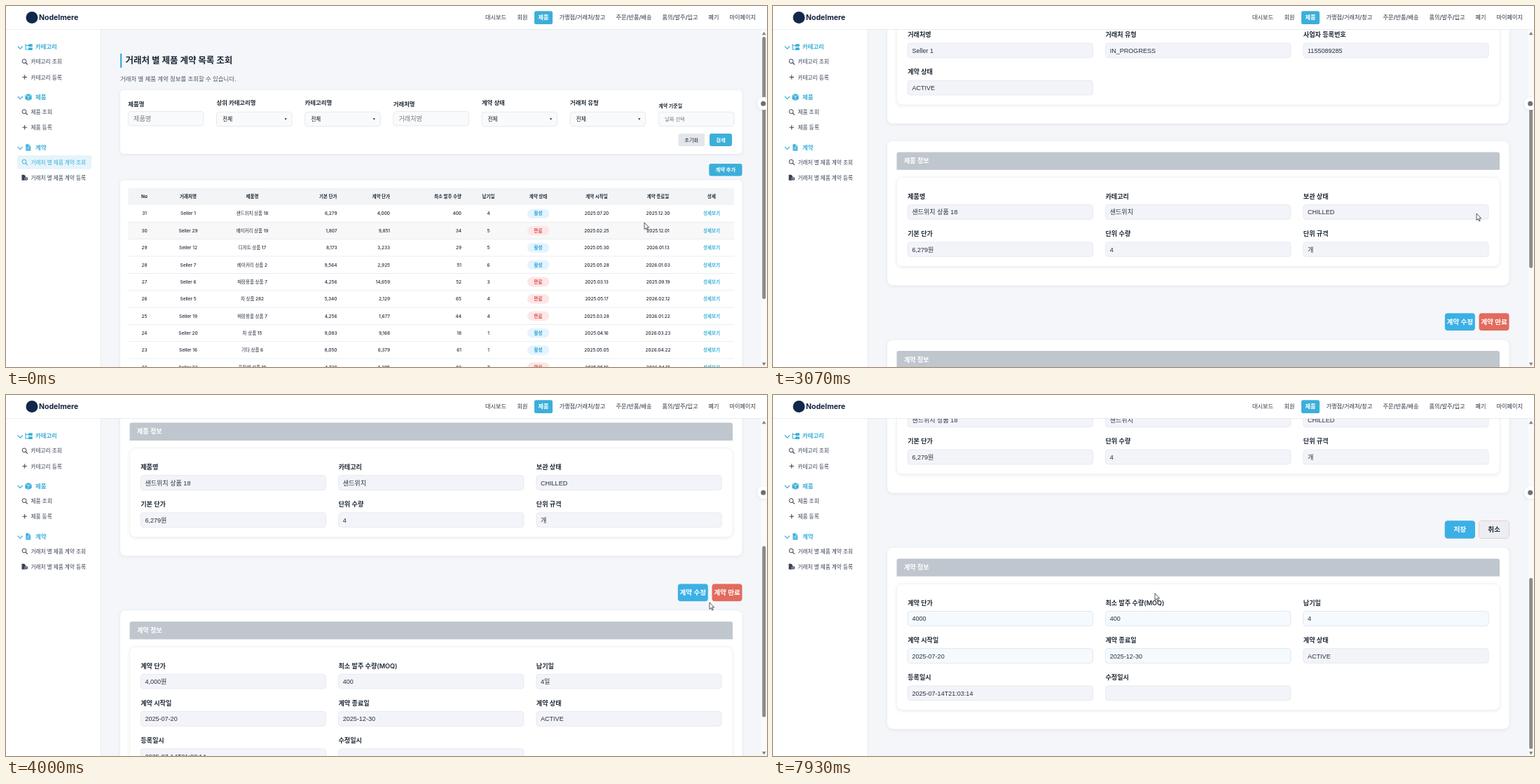
An HTML page for the animation above (8000 ms loop, 1086 by 515 pixels).

```html
<!DOCTYPE html>
<html lang="ko">
<head>
<meta charset="utf-8">
<title>계약 관리</title>
<style>
html, body { margin: 0; width: 100%; height: 100%; overflow: hidden; background: #f4f6fa; }
svg { display: block; width: 1086px; height: 515px; }
text { font-family: Inter, "Noto Sans CJK KR", "Noto Sans CJK", sans-serif; white-space: pre; }
.input text { font-family: "Liberation Sans", "Noto Sans CJK KR", "Noto Sans CJK", sans-serif; }
.status text { font-family: "Open Sans", sans-serif; }
.card { filter: drop-shadow(0 1px 2px #1c2a4418); }
</style>
</head>
<body>
<svg id="stage" viewBox="0 0 1086 515"></svg>
<script>
const BLUE = '#3bafda', INK = '#1f2937', LOOP = 8000, NOTCH = 56.3, MAX = 427.6;
const ROW_TOP = 284, ROW_H = 24.35;

const text = (x, y, s, size, fill = INK, weight = 400, anchor = 'start') =>
  `<text x="${x}" y="${y + size * .36}" font-size="${size}" fill="${fill}" font-weight="${weight}" text-anchor="${anchor}">${s}</text>`;
const rect = (x, y, w, h, fill, r = 0, more = '') =>
  `<rect x="${x}" y="${y}" width="${w}" height="${h}" rx="${r}" fill="${fill}" ${more}/>`;
const path = (d, fill, stroke = 'none', width = 1, more = '') =>
  `<path d="${d}" fill="${fill}" stroke="${stroke}" stroke-width="${width}" ${more}/>`;
const group = (id, body, more = '') => `<g id="${id}" ${more}>${body}</g>`;
const input = body => `<g class="input">${body}</g>`;
const card = (y, h, r = 6) => rect(163, y, 887.5, h, '#fff', r, 'class="card"');
const button = (x, y, w, h, label, size, fill, color = '#fff', r = 3, weight = 700) =>
  rect(x, y, w, h, fill, r) + text(x + w / 2, y + h / 2, label, size, color, weight, 'middle');
const heading = (title, note) => rect(163, 68, 2.3, 20, BLUE) +
  text(170.5, 77.5, title, 12.5, INK, 700) + text(163, 103.5, note, 8.4, '#4b5563');

// Top bar
const nav = [[684, '대시보드'], [729.5, '회원'], [759.5, '제품'], [789.5, '가맹점/거래처/창고'],
  [870.5, '주문/반품/배송'], [936.5, '품의/발주/입고'], [1002.5, '폐기'], [1032.5, '마이페이지']];
const header = () => rect(0, 0, 1086, 33.5, '#fff') + rect(0, 33, 1086, .8, '#e3e6eb') +
  '<circle cx="37" cy="16.5" r="8.5" fill="#10284a"/>' + text(47, 16.7, 'Nodelmere', 10.5, '#14233f', 700) +
  rect(754, 7.3, 26, 18.7, BLUE, 2.5) +
  nav.map(([x, s], i) => text(x, 16.2, s, 8.15, i == 2 ? '#fff' : '#283341', i == 2 ? 700 : 500)).join('');

// Side menu
const icons = {
  search: (y, c) => `<circle cx="26" cy="${y - .7}" r="2.9" fill="none" stroke="${c}"/>` + path(`M28.2 ${y + 1.5}l2.6 2.6`, 'none', c, 1.2),
  plus: (y, c) => path(`M23.5 ${y - .5}h6.4m-3.2-3.2v6.4`, 'none', c),
  file: (y, c) => path(`M22.5 ${y - 4}h3.5l2 2v6h-5.5z`, c) + `<circle cx="29" cy="${y + 1.7}" r="2.4" fill="${c}" stroke="#fff" stroke-width=".5"/>` +
    path(`M27.9 ${y + 1.7}h2.2m-1.1-1.1v2.2`, 'none', '#fff', .5),
  tree: y => path(`M28 ${y - 4.5}v8h4.5M28 ${y - 2}h4.5`, 'none', BLUE, 1.1) + rect(32, y - 4.3, 5.8, 3.8, BLUE, .7) + rect(32, y + .8, 5.8, 3.8, BLUE, .7),
  box: y => path(`M32 ${y - 4.8}l4.6 1.8v6l-4.6 2-4.6-2v-6z`, BLUE) + path(`M27.8 ${y - 2.6}l4.2 1.6 4.2-1.6M32 ${y - 1}v5`, 'none', '#fff', .7),
  sheet: y => path(`M28.3 ${y - 4.6}h4.4l2.5 2.5v6.9h-6.9z`, BLUE) + path(`M29.5 ${y}h4.4m-4.4 2.4h1.6l1-1.2 .8 1.2h1M32.5 ${y - 4.5}v2.6h2.6`, 'none', '#fff', .6)
};
const menu = [
  [58.5, '카테고리', 'tree', [[79.5, 'search', '카테고리 조회'], [102, 'plus', '카테고리 등록']]],
  [130, '제품', 'box', [[151.3, 'search', '제품 조회'], [173.7, 'plus', '제품 등록']]],
  [201.8, '계약', 'sheet', [[222.8, 'search', '거래처 별 제품 계약 조회'], [244.8, 'file', '거래처 별 제품 계약 등록']]]
];
const menuItem = ([y, icon, s], c = '#374151') => icons[icon](y, c) + text(35.5, y, s, 7.65, c, 500);
const sidebar = () => rect(0, 33.8, 135.5, 482, '#fff') + rect(135, 33.8, .8, 482, '#e3e6eb') +
  menu.map(([y, s, icon, items]) => path(`M16.8 ${y - 1}l3.5 3.6 3.5-3.6`, 'none', BLUE, 1.2) +
    icons[icon](y) + text(42, y - .2, s, 8.4, BLUE, 700) + items.map(i => menuItem(i)).join('')).join('') +
  group('selected', rect(16, 213, 106, 19.7, '#e6f4fb', 3) + menuItem(menu[2][3][0], BLUE));

// Contract list
const filters = ['제품명', '상위 카테고리명', '카테고리명', '거래처명', '계약 상태', '거래처 유형', '계약 기준일'];
const filterBox = (label, i) => {
  const x = 174.3 + i * 126.15, free = i == 0 || i == 3, date = i == 6;
  const y = free ? 150.4 : 151.2;
  return text(x, free ? 140.3 : date ? 142 : 137.6, label, date ? 7 : 8.4, INK, 600) +
    rect(x, y, 107.7, 20.5, '#f9fafb', 4, 'stroke="#dde1e7" stroke-width=".7"') +
    input(free ? text(x + 7.8, 160.6, label, 9.05, '#757b86') :
      date ? text(x + 9, 161.2, '날짜 선택', 7.2, '#757b86') :
      text(x + 8.8, 161.2, '전체', 7.5, '#111') + path(`M${x + 97} 160.2h3.4l-1.7 2.2z`, '#222'));
};
const columns = [[197.5, 'No', 'middle'], [260, '거래처명', 'middle'], [351.5, '제품명', 'middle'],
  [472.5, '기본 단가', 'end'], [548, '계약 단가', 'end'], [650, '최소 발주 수량', 'end'], [688.5, '납기일', 'middle'],
  [759.5, '계약 상태', 'middle'], [843, '계약 시작일', 'middle'], [930.5, '계약 종료일', 'middle'], [1007, '상세', 'middle']];
const rows = `1|샌드위치 상품 18|6,279|4,000|400|4|활성|2025.07.20|2025.12.30
29|베이커리 상품 19|1,807|9,851|34|5|만료|2025.02.25|2025.12.01
12|디저트 상품 17|8,173|3,233|29|5|활성|2025.05.30|2026.01.13
7|베이커리 상품 2|9,564|2,925|51|6|활성|2025.05.28|2026.01.03
6|매장용품 상품 7|4,256|14,659|52|3|만료|2025.03.13|2025.09.19
5|차 상품 282|5,340|2,129|65|4|만료|2025.05.17|2026.02.12
19|매장용품 상품 7|4,256|1,677|44|4|만료|2025.03.28|2026.01.22
20|차 상품 15|9,083|9,168|18|1|활성|2025.04.16|2026.03.23
16|기타 상품 6|8,050|6,379|61|1|활성|2025.05.05|2026.04.22
23|포장재 상품 10|4,739|4,205|82|7|만료|2025.05.19|2026.04.17`.split('\n').map(r => r.split('|'));
const tableRow = (r, i) => {
  const y = ROW_TOP + ROW_H * (i + .5), cells = [31 - i, 'Seller ' + r[0], ...r.slice(1), '상세보기'];
  const on = r[6] == '활성';
  return rect(174.3, y + ROW_H / 2 - .4, 865, .7, '#e3e6ea') +
    rect(744, y - 6.8, 31.2, 13.6, on ? '#e3f4fe' : '#fde6e6', 6.8) +
    cells.map((s, k) => {
      const [x, , anchor] = columns[k];
      const color = k == 7 ? (on ? '#1d9bd8' : '#dc3f3f') : k == 10 ? BLUE : INK;
      const t = text(x, y, s, 6.45, color, k == 7 || k == 10 ? 600 : 500, anchor);
      return i == 0 && k == 10 ? group('link', t) : t;
    }).join('');
};
const list = () => heading('거래처 별 제품 계약 목록 조회', '거래처 별 제품 계약 정보를 조회할 수 있습니다.') +
  card(120, 91, 5) + filters.map(filterBox).join('') +
  button(959.5, 182, 37.5, 18, '초기화', 7.2, '#e3e6ea', INK, 3, 500) +
  button(1004, 182, 32, 18, '검색', 7.4, BLUE) + button(1003.3, 225, 47.2, 17.6, '계약 추가', 7.4, BLUE) +
  card(248.5, 400, 5) + rect(174.3, 259.5, 865, 24.5, '#f2f4f6') +
  columns.map(([x, s, a]) => text(x, 271.7, s, 6.5, INK, 700, a)).join('') +
  rect(174.3, ROW_TOP, 865, ROW_H, '#f8f8f9', 0, 'id="hover"') + rows.map(tableRow).join('');

// Contract detail
const panel = (top, title, fields) => {
  const inner = 20.6 + 53.2 * Math.ceil(fields.length / 3);
  return card(top, inner + 78.6, 8) +
    path(`M176.5 ${top + 41}v-22.3q0-3 3-3h854.5q3 0 3 3v22.3z`, '#c0c6ce') + text(187, top + 28.2, title, 9.1, '#fff', 700) +
    rect(176.5, top + 51.8, 860.5, inner, '#fff', 8, 'class="card" stroke="#eef0f4" stroke-width=".7"') +
    fields.map(([label, value, edit], i) => {
      const x = 192.2 + i % 3 * 282.3, y = top + 78.8 + 53.2 * (i / 3 | 0);
      const box = (fill, s) => rect(x, y + 12, 264.3, 20.8, fill, 4, 'stroke="#e0e4ea" stroke-width=".7"') +
        input(text(x + 6.2, y + 22.6, s, 9.05, '#27303d'));
      return text(x, y, label, 9.1, INK, 600) + box('#f3f4f9', value) +
        (edit ? `<g class="edit">${box('#f5faff', edit)}</g>` : '');
    }).join('');
};
const detail = () => heading('거래처 별 제품 계약 상세 조회', '거래처 별 제품 계약 상세 정보를 조회할 수 있습니다.') +
  panel(131.1, '거래처 정보', [['거래처명', 'Seller 1'], ['거래처 유형', 'IN_PROGRESS'], ['사업자 등록번호', '1155089285'], ['계약 상태', 'ACTIVE']]) +
  panel(361.7, '제품 정보', [['제품명', '샌드위치 상품 18'], ['카테고리', '샌드위치'], ['보관 상태', 'CHILLED'],
    ['기본 단가', '6,279원'], ['단위 수량', '4'], ['단위 규격', '개']]) +
  button(958.8, 607.2, 43, 24.8, '계약 수정', 9.6, '#3bb0e5', '#fff', 4) +
  button(1007.5, 607.2, 43, 24.8, '계약 만료', 9.6, '#e26b5d', '#fff', 4) +
  `<g class="edit">${button(958.8, 607.2, 43, 24.8, '저장', 9.6, '#3bb0e5', '#fff', 4) +
    button(1007.5, 607.2, 43, 24.8, '취소', 9.6, '#eceef1', INK, 4, 600)}</g>` +
  panel(645.3, '계약 정보', [['계약 단가', '4,000원', '4000'], ['최소 발주 수량(MOQ)', '400', '400'], ['납기일', '4일', '4'],
    ['계약 시작일', '2025-07-20', '2025-07-20'], ['계약 종료일', '2025-12-30', '2025-12-30'], ['계약 상태', 'ACTIVE'],
    ['등록일시', '2025-07-14T21:03:14'], ['수정일시', '']]);

const scrollbar = () => rect(1077.5, 33.8, 8.5, 482, '#fafafa') + path('M1078.8 41.2l2.9-4.4 2.9 4.4z', '#858585') +
  path('M1078.8 508.8l2.9 4.4 2.9-4.4z', '#858585') + rect(1079.2, 44, 5, 374, '#8b8b8b', 2.5, 'id="thumb"') +
  '<circle class="card" cx="1081.5" cy="139" r="9.3" fill="#fff"/><circle cx="1080.7" cy="139.2" r="3.5" fill="#6f6f6f"/>';
const arrow = path('M0 0v9.6l2.2-2 1.5 3.4 1.5-.7-1.5-3.3h2.9z', '#fff', '#111', .7);
const hand = path('M-1 .6q1-1.2 1.9 0v4l4 .9q1.3.4 1.1 1.8l-.7 3.3-.8 2.2h-4.7l-3.1-4q-.4-1.4 1-1.2l1.3 1z', '#fff', '#111', .7);

const $ = id => document.getElementById(id);
$('stage').innerHTML = rect(0, 0, 1086, 515, '#f4f6fa') + group('list', list()) + group('detail', detail()) +
  header() + sidebar() + scrollbar() +
  group('status', path('M0 503h86q3 0 3 3v9h-89z', '#d5e4f7') + text(2, 509.2, 'localhost:5173/contract/31', 6.35, '#2b3442'), 'class="status"') +
  group('pointer', group('arrow', arrow) + group('hand', hand));

// Eased track through [time, ...values] points
function track(keys, t) {
  let i = keys.findIndex(k => k[0] > t);
  if (i < 0) return keys.at(-1).slice(1);
  if (i == 0) return keys[0].slice(1);
  const a = keys[i - 1], b = keys[i], u = (t - a[0]) / (b[0] - a[0]), e = u * u * (3 - 2 * u);
  return a.slice(1).map((v, k) => v + (b[k + 1] - v) * e);
}
const scrollKeys = [[2060, 0], [2330, 1], [2440, 1], [2730, 3], [3070, 3], [3270, 4], [3310, 4], [3600, 5],
  [3820, 5], [4000, 6], [4230, 6], [4470, 7], [5830, 7], [6030, MAX / NOTCH]];
const pointerKeys = [[40, 911, 309], [730, 1007, 294], [1800, 1007, 294], [1870, 1004, 296], [4500, 1004, 296],
  [5070, 977, 253], [5200, 980, 242], [5900, 980, 242], [6400, 985, 190], [7560, 985, 190], [7930, 545, 283]];
const show = (el, on) => el.style.display = on ? '' : 'none';
const edits = document.querySelectorAll('.edit');

function draw(t) {
  const onList = t < 1870, scroll = track(scrollKeys, t)[0] * NOTCH, [x, y] = track(pointerKeys, t);
  const row = Math.floor((y - ROW_TOP) / ROW_H);
  const onLink = onList && row == 0 && x > 994;
  const buttonY = 607.2 - scroll;
  const onButton = !onList && x > 959 && x < 1002 && y > buttonY && y < buttonY + 24.8;

  show($('list'), onList);
  show($('detail'), !onList);
  show($('selected'), onList);
  edits.forEach(e => show(e, t >= 7200));
  $('hover').setAttribute('y', ROW_TOP + row * ROW_H);
  $('link').firstChild.setAttribute('fill', onLink ? '#17324d' : BLUE);
  $('detail').setAttribute('transform', `translate(0 ${-scroll})`);
  $('thumb').setAttribute('y', 44 + (onList ? 0 : scroll / MAX * 217));
  $('thumb').setAttribute('height', onList ? 374 : 244);
  $('status').style.opacity = onList ? +onLink : Math.max(0, Math.min(1, (2200 - t) / 130));
  $('pointer').setAttribute('transform', `translate(${x} ${y})`);
  show($('hand'), onLink || onButton);
  show($('arrow'), !onLink && !onButton);
}

const start = performance.now();
(function frame() {
  draw((performance.now() - start) % LOOP);
  requestAnimationFrame(frame);
})();
</script>
</body>
</html>
```
